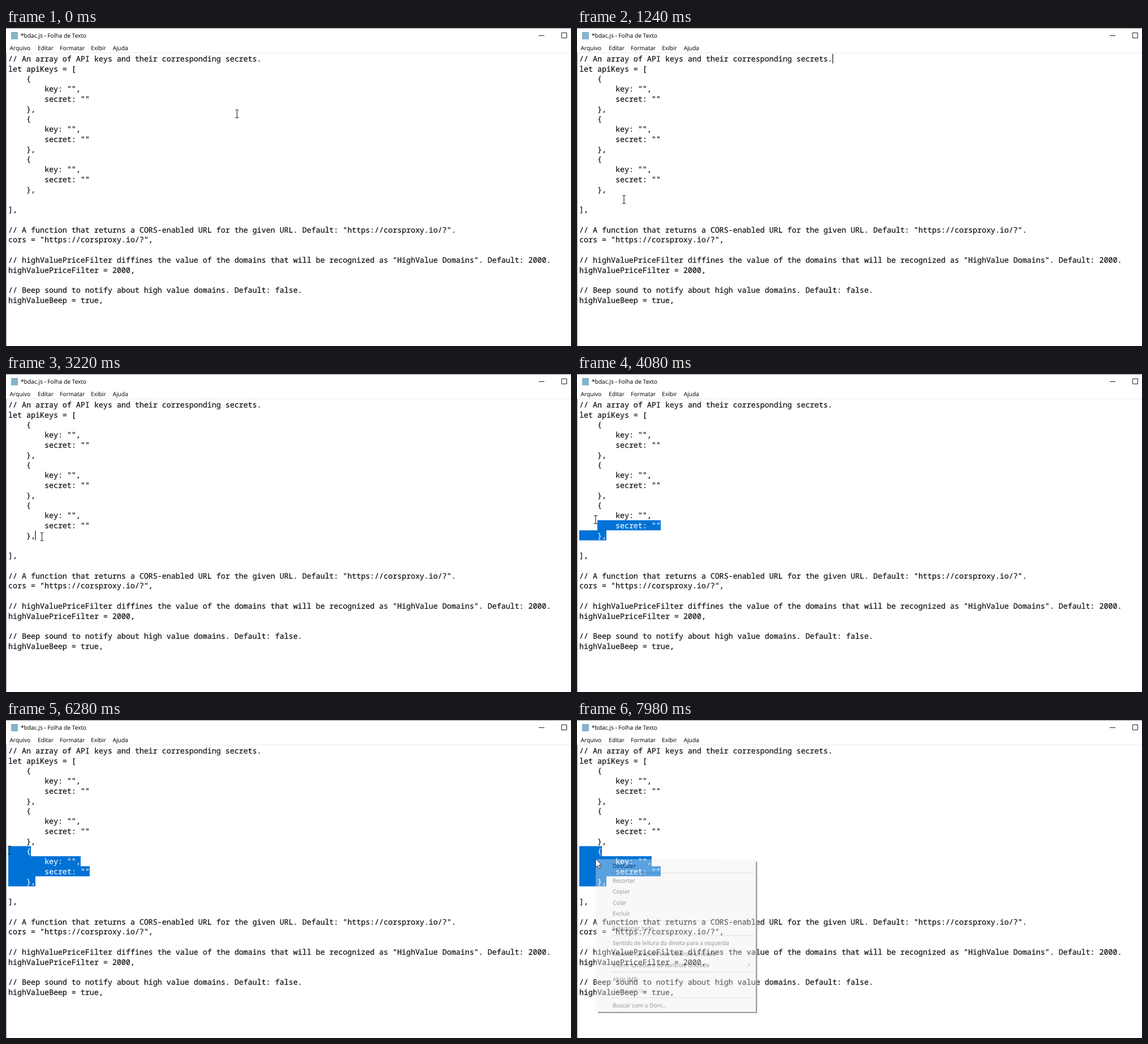
Write an HTML page that moves like this. It is 998 px wide and 561 px high and loops after 8 s.

```html
<!DOCTYPE html>
<html lang="pt">
<head>
<meta charset="utf-8">
<title>Editor</title>
<style>
  html, body { margin: 0; width: 100%; height: 100%; overflow: hidden; background: #fff; }
  svg { display: block; width: 100vw; height: 100vh; }
  text { white-space: pre; text-rendering: geometricPrecision; }
  .code { font: 13.32px "Noto Sans Mono", monospace; stroke-width: .25px; }
  .ui { font: 10.2px "Open Sans", "Noto Sans", sans-serif; }
  #bar { stroke: #1a1a1a; stroke-width: .12px; }
  #lines { fill: #141414; stroke: #141414; }
  #selectedLines { fill: #e9f4ff; stroke: #e9f4ff; }
  #menu { font-size: 9.95px; }
  #menu text { stroke: currentColor; stroke-width: .2px; }
</style>
</head>
<body>
<svg id="stage" viewBox="0 0 998 561" xmlns="http://www.w3.org/2000/svg">
  <defs><clipPath id="selectionClip"><path id="clipShape"/></clipPath></defs>
  <rect width="998" height="561" fill="#fff"/>
  <rect width="998" height="1" fill="#8c8c8c"/>
  <rect y="43.5" width="998" height="1" fill="#e9e9e9"/>
  <rect y="44" width="1" height="517" fill="#8f9aa3"/>
  <rect x="9" y="7" width="12" height="13" fill="#83b4cb"/>
  <path d="M941 13.5h10M981.5 8.5h9v9h-9z" fill="none" stroke="#222"/>
  <g id="bar" class="ui" fill="#1a1a1a"></g>
  <g id="lines" class="code"></g>
  <path id="selection" fill="#0072d6"/>
  <g clip-path="url(#selectionClip)"><g id="selectedLines" class="code"></g></g>
  <rect id="caret" width="1.2" height="17" fill="#111"/>
  <g id="menuShadow">
    <path d="M316 250h1.6v266.6H37v-1.6h279z" fill="#7b7b7b"/>
    <path d="M317.6 251h1v266.6H38v-1h279.6z" fill="#c8c8c8"/>
  </g>
  <g id="menu" class="ui">
    <rect x="33" y="245.5" width="283" height="269.5" fill="#eee"/>
    <path d="M302 429l3 3l-3 3" fill="none" stroke="#222"/>
  </g>
  <path id="beam" d="M-3 -7h2.2L0 -6.3L.8 -7H3M0 -6.3V6.3M-3 7h2.2L0 6.3L.8 7H3" fill="none" stroke="#333" stroke-width="1.2"/>
  <path id="arrow" d="M0 0v15l3.4 -3.2l2.4 5.4l2.4 -1l-2.4 -5.3h4.7z" fill="#fff" stroke="#222" stroke-width=".9"/>
</svg>
<script>
const LOOP = 8000;
const LEFT = 4, TOP = 45, CELL = 7.992, ROW = 17.75;
const ANCHOR = { row: 13, col: 6 };
const DRAG_START = 3660, DRAG_END = 6600, DRAG_LAG = 60, MENU_OPEN = 7860;

const entry = ['    {', '        key: "",', '        secret: ""', '    },'];
const code = [
  '// An array of API keys and their corresponding secrets.',
  'let apiKeys = [',
  ...entry, ...entry, ...entry,
  '',
  '],',
  '',
  '// A function that returns a CORS-enabled URL for the given URL. Default: "https://corsproxy.io/?".',
  'cors = "https://corsproxy.io/?",',
  '',
  '// highValuePriceFilter diffines the value of the domains that will be recognized as "HighValue Domains". Default: 2000.',
  'highValuePriceFilter = 2000,',
  '',
  '// Beep sound to notify about high value domains. Default: false.',
  'highValueBeep = true,'
];

const menuItems = [
  ['Desfazer', 257], ['Recortar', 283], ['Copiar', 302], ['Colar', 322], ['Excluir', 341],
  ['Selecionar tudo', 367], ['Sentido de leitura da direita para a esquerda', 393],
  ['Mostrar caracteres de controle Unicode', 412], ['Inserir caractere de controle Unicode', 432],
  ['Abrir IME', 457], ['Reconversão', 477, '#8a8a8a'], ['Buscar com o Dorv...', 503]
];
const separators = [270, 354, 380, 444.5, 490];

// Pointer keys: time, x, y
const pointerPath = [
  [20, 408, 151.5], [420, 322, 218], [820, 190, 296.5], [1020, 122, 302], [1240, 83, 302.5],
  [1560, 78.5, 296.5], [1660, 78.5, 296.5], [1700, 78.5, 292.5], [1940, 78.5, 292.5],
  [2640, 64.5, 288.5], [3060, 64.5, 288.5], [3220, 63.5, 287], [3660, 63.5, 287],
  [4080, 33, 257], [4460, 20, 239], [5020, 10, 231], [5880, 10, 231], [6460, 4, 229],
  [7120, 4, 229], [7300, 20, 239], [7400, 20, 239], [7760, 33, 245]
];

const $ = id => document.getElementById(id);

function add(parent, tag, attrs, content = '') {
  const node = document.createElementNS('http://www.w3.org/2000/svg', tag);
  for (const name in attrs) node.setAttribute(name, attrs[name]);
  node.textContent = content;
  parent.append(node);
}

function build() {
  const bar = $('bar');
  add(bar, 'text', { x: 26, y: 17.3 }, '*bdac.js - Folha de Texto');
  [['Arquivo', 6.5], ['Editar', 56], ['Formatar', 95], ['Exibir', 150], ['Ajuda', 188.5]]
    .forEach(([label, x]) => add(bar, 'text', { x, y: 39.4 }, label));

  code.forEach((line, row) => {
    const content = line.trimStart();
    const x = LEFT + (line.length - content.length) * CELL;
    for (const layer of ['lines', 'selectedLines'])
      add($(layer), 'text', { x, y: TOP + row * ROW + 13.8 }, content);
  });

  const menu = $('menu');
  for (const y of separators)
    add(menu, 'rect', { x: 60, y: y - 0.5, width: 253, height: 1, fill: '#aaa' });
  for (const [label, y, color = '#111'] of menuItems)
    add(menu, 'text', { x: 63, y: y + 3.7, fill: color, color }, label);
}

function pointerAt(t) {
  const next = pointerPath.findIndex(key => key[0] > t);
  if (next === 0) return pointerPath[0].slice(1);
  if (next < 0) return pointerPath.at(-1).slice(1);
  const [t0, x0, y0] = pointerPath[next - 1];
  const [t1, x1, y1] = pointerPath[next];
  const k = (t - t0) / (t1 - t0);
  return [x0 + (x1 - x0) * k, y0 + (y1 - y0) * k];
}

// The selection follows the pointer until the button is released.
function selectionPath(t) {
  if (t < DRAG_START) return '';
  const [x, y] = pointerAt(Math.min(t, DRAG_END) - DRAG_LAG);
  const first = Math.floor((y - TOP) / ROW);
  const firstCol = Math.min(Math.round((x - LEFT) / CELL), code[first].length);
  let d = '';
  for (let row = first; row <= ANCHOR.row; row++) {
    const from = row === first ? firstCol : 0;
    const to = row === ANCHOR.row ? ANCHOR.col : code[row].length;
    if (to > from)
      d += `M${LEFT + from * CELL} ${TOP + row * ROW}h${(to - from) * CELL}v${ROW}h${(from - to) * CELL}z`;
  }
  return d;
}

function show(id, visible) {
  $(id).setAttribute('visibility', visible ? 'visible' : 'hidden');
}

function moveTo(id, x, y) {
  $(id).setAttribute('transform', `translate(${x} ${y})`);
}

function render(t) {
  const [x, y] = pointerAt(t);
  const open = t >= MENU_OPEN;
  moveTo('beam', x, y);
  moveTo('arrow', x, y);
  show('beam', !open);
  show('arrow', open);

  const shape = selectionPath(t);
  $('selection').setAttribute('d', shape);
  $('clipShape').setAttribute('d', shape);

  const onFirstLine = t >= 1060 && t < 2120;
  const onAnchor = t >= 3160 && t < DRAG_START + 40;
  show('caret', onFirstLine || onAnchor);
  if (onAnchor) moveTo('caret', LEFT + ANCHOR.col * CELL - 0.6, TOP + ANCHOR.row * ROW + 0.6);
  else moveTo('caret', 451.2, TOP + 0.6);

  show('menuShadow', open);
  show('menu', open);
  $('menu').setAttribute('opacity', t < 7960 ? 0.15 : t < 7980 ? 0.3 : 0.38);
}

build();
const start = performance.now();
function tick() {
  render((performance.now() - start) % LOOP);
  requestAnimationFrame(tick);
}
tick();
</script>
</body>
</html>
```
